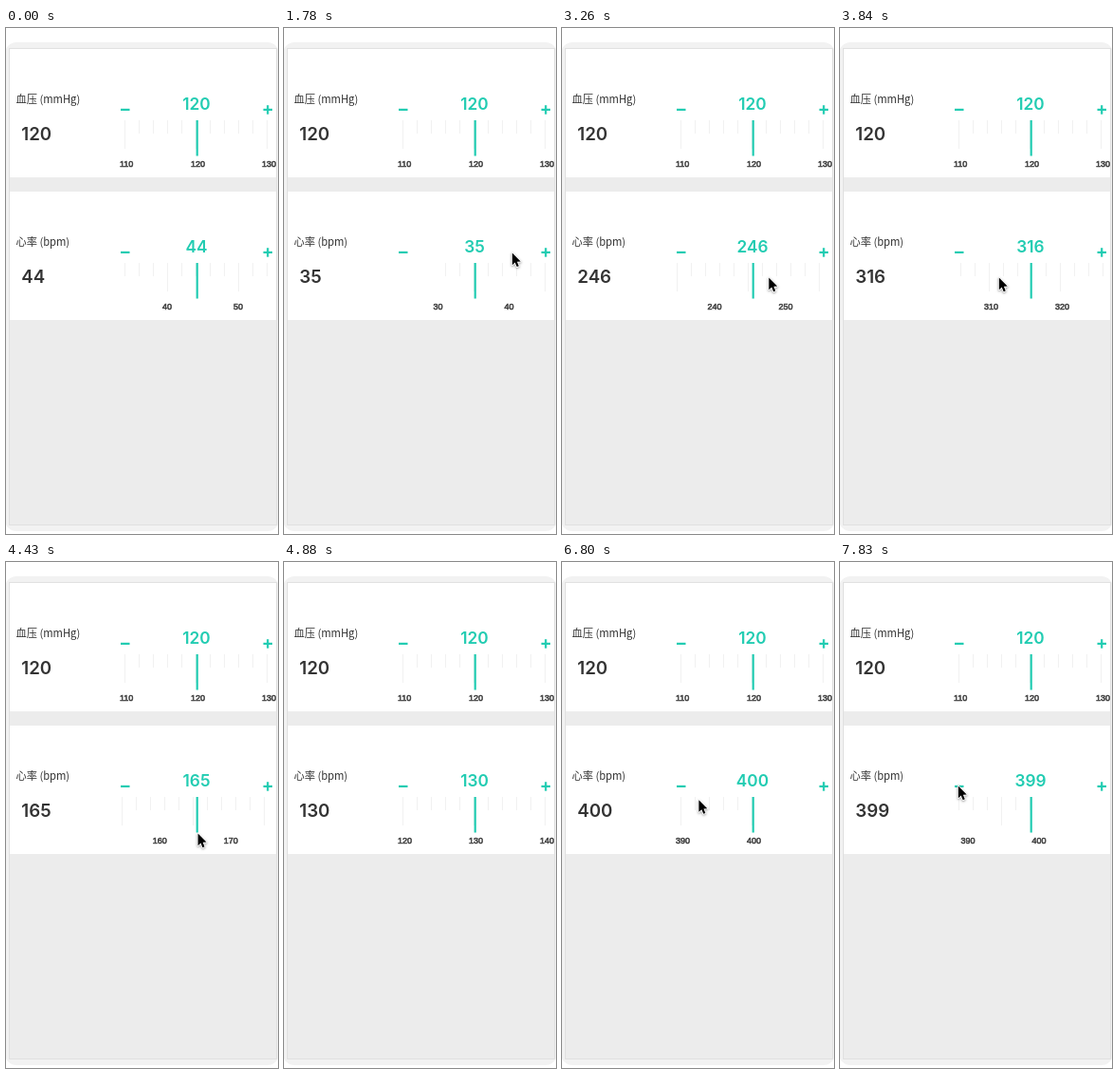
Recreate the animation shown at these times as an HTML page with a canvas. Size 287 px wide and 532 px high, loop 8000 ms.

```html
<!DOCTYPE html>
<html lang="zh">
<head>
<meta charset="utf-8">
<title>Ruler picker</title>
<style>
html, body { margin: 0; width: 100%; height: 100%; overflow: hidden; background: #fff; }
canvas { display: block; width: 287px; height: 532px; }
</style>
</head>
<body>
<canvas id="stage"></canvas>
<script>
const W = 287, H = 532, LOOP = 8000;
const START = 1038, STEP = 147.4;      // the picture advances in fixed steps
const MID = 200.2, UNIT = 7.5;         // ruler centre and pixels per unit
const MIN = 30, MAX = 400, FIRST = 44;
const TEAL = '#22ccb2', DARK = '#333', GREY = '#444';

const canvas = document.getElementById('stage');
const ctx = canvas.getContext('2d');
const dpr = window.devicePixelRatio || 1;
canvas.width = W * dpr;
canvas.height = H * dpr;

// Ruler moves: each eases out from wherever the last one stopped.
const moves = [
  { start: 2, end: 5, to: 35, power: 1 },
  { start: 11, end: 19, to: 315.73, power: 2 },
  { start: 19, end: 26, to: 130, power: 1.957 },
  { start: 32, end: 36, to: MAX, power: 2 },
  { start: 44, end: 46, to: MAX - 1, power: 1 }
];

// Pointer strokes, each shown until it is lifted.
const strokes = [
  { start: 0, end: 7, until: 8, from: [217.7, 139], to: [246, 262], power: 1.24 },
  { start: 11, end: 19, until: 20, from: [268, 262], to: [167, 262], power: 1 },
  { start: 20, end: 25, until: 26, from: [190, 285], to: [204, 285], power: 2 },
  { start: 33, end: 36, until: 38, from: [258, 257], to: [156, 257], power: 1 },
  { start: 38, end: 43, until: 99, from: [156, 259], to: [124, 235], power: 2.2 }
];

const mix = (a, b, f) => a + (b - a) * f;

function progress({ start, end, power }, k) {
  const p = Math.min(1, Math.max(0, (k - start) / (end - start)));
  return 1 - (1 - p) ** power;
}

const valueAt = k => moves.reduce((v, m) => mix(v, m.to, progress(m, k)), FIRST);

function rect(color, x, y, w, h) {
  ctx.fillStyle = color;
  ctx.fillRect(x, y, w, h);
}

function text(str, x, y, font, color, align = 'left') {
  ctx.font = font;
  ctx.fillStyle = color;
  ctx.textAlign = align;
  ctx.fillText(str, x, y);
}

function drawFrame() {
  rect('#fff', 0, 0, W, H);
  ctx.fillStyle = '#f2f2f2';
  ctx.beginPath();
  ctx.roundRect(-1, 15, W + 2, 514, 12);
  ctx.fill();
  rect('#e0e0e0', 3, 21, 283, 502);
  rect('#ececec', 4, 22, 281, 500);
}

function drawRuler(value) {
  ctx.save();
  ctx.beginPath();
  ctx.rect(118, 90, 168, 64);
  ctx.clip();
  const from = Math.max(MIN, Math.floor(value) - 13);
  const to = Math.min(MAX, Math.ceil(value) + 13);
  for (let n = from; n <= to; n++) {
    const x = MID + (n - value) * UNIT;
    // only marks that land on a whole pixel show
    if (x - Math.floor(x) < 0.5) {
      rect('#f1f1f1', Math.floor(x), 97, 1, n % 5 ? 14 : 30);
    }
    if (n % 10 === 0) {
      text(n, x - 5.2, 146.2, '9px "Liberation Sans", Arial, sans-serif', GREY);
      ctx.strokeStyle = GREY;
      ctx.lineWidth = 0.6;
      ctx.strokeText(n, x - 5.2, 146.2);
    }
  }
  ctx.restore();
}

function drawPanel(top, label, value) {
  const shown = Math.round(value);
  ctx.save();
  ctx.translate(0, top);
  rect('#fff', 4, 22, 281, 135);
  text(label, 10.5, 79, '11.2px "Noto Sans CJK SC", "Noto Sans CJK", "Noto Sans", sans-serif', DARK);
  text(shown, 16.3, 117.8, '600 18.7px Inter, sans-serif', DARK);
  text(shown, 201, 86.2, '600 17.3px Inter, sans-serif', TEAL, 'center');
  drawRuler(value);
  rect(TEAL, 200.6, 97, 2.2, 37.5);
  rect(TEAL, 121, 84.8, 9.5, 2.2);
  rect(TEAL, 271.5, 84.8, 9.5, 2.2);
  rect(TEAL, 275.1, 81.2, 2.2, 9.5);
  ctx.restore();
}

const arrow = [[0, 0], [0, 14.6], [3.4, 11.5], [5.7, 16.9], [8.1, 15.9], [5.9, 10.7], [10.4, 10.4]];

function drawPointer(x, y) {
  ctx.save();
  ctx.translate(x + 0.8, y + 0.6);
  ctx.scale(0.86, 0.86);
  ctx.beginPath();
  arrow.forEach(p => ctx.lineTo(...p));
  ctx.closePath();
  ctx.lineJoin = 'round';
  ctx.lineWidth = 2;
  ctx.strokeStyle = '#fff';
  ctx.shadowColor = 'rgba(0,0,0,.4)';
  ctx.shadowBlur = 2.5 * dpr;
  ctx.shadowOffsetY = dpr;
  ctx.stroke();
  ctx.shadowColor = 'transparent';
  ctx.fillStyle = '#000';
  ctx.fill();
  ctx.restore();
}

function draw(now) {
  const k = Math.floor((now % LOOP - START) / STEP);
  ctx.setTransform(dpr, 0, 0, dpr, 0, 0);
  drawFrame();
  drawPanel(0, '血压 (mmHg)', 120);
  drawPanel(150, '心率 (bpm)', valueAt(k));
  const s = strokes.find(s => k >= s.start && k < s.until);
  if (s) drawPointer(...s.from.map((v, i) => mix(v, s.to[i], progress(s, k))));
}

let begin = null;
function loop(now) {
  if (begin === null) begin = now;
  draw(now - begin);
  requestAnimationFrame(loop);
}
draw(0);
requestAnimationFrame(loop);
</script>
</body>
</html>
```
